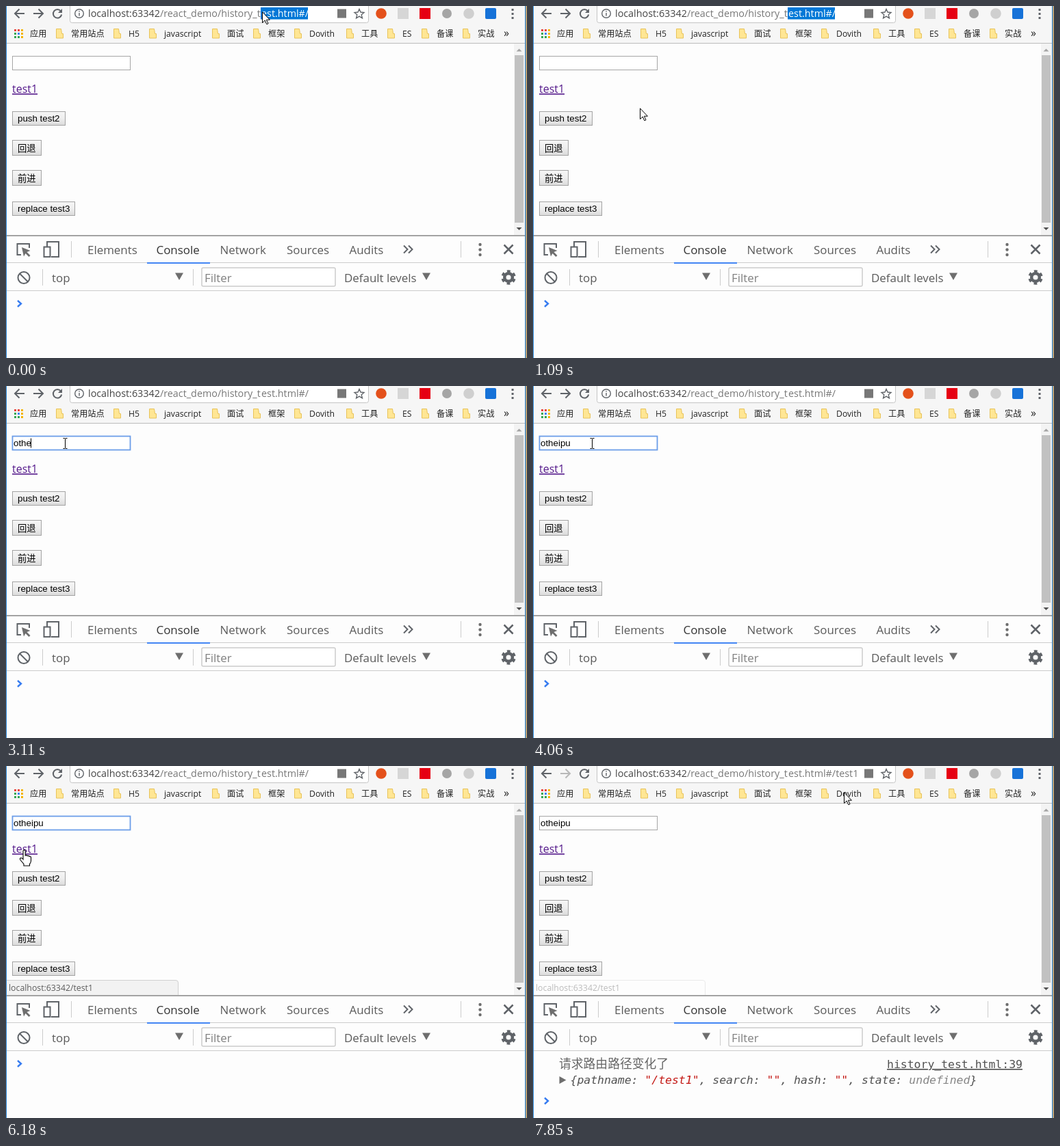
Animation of 761x515 px, one loop 7.99 s. Source, as an HTML page:

```html
<!DOCTYPE html>
<html lang="zh">
<head>
<meta charset="utf-8">
<title>History demo</title>
<style>
html, body { margin: 0; width: 100%; height: 100%; overflow: hidden; background: #fdfdfd; }
svg { display: block; }
text { white-space: pre; font-family: 'Open Sans', 'Noto Sans CJK SC', 'Noto Sans CJK', sans-serif; }
.url { font-size: 14.35px; fill: #777; }
.mark { font-size: 12.2px; fill: #222; }
.form { font: 13.333px 'Liberation Sans', 'Noto Sans CJK SC', 'Noto Sans CJK', sans-serif; fill: #000; }
.tool { font-size: 16.9px; fill: #5a5a5a; }
.mono { font: 16.45px 'DejaVu Sans Mono', monospace; fill: #505050; }
.log { font: 300 17.8px 'Noto Sans CJK SC', 'Noto Sans CJK', sans-serif; fill: #666; }
.line { fill: none; stroke: #5f6368; stroke-width: 2; }
.thin { stroke-width: 1.4; }
.rule { stroke: #ccc; fill: none; }
</style>
</head>
<body>
<svg width="761" height="515" viewBox="0 0 761 515">
  <defs>
    <linearGradient id="face" x2="0" y2="1">
      <stop offset="0" stop-color="#f6f6f6"/><stop offset=".5" stop-color="#eee"/><stop offset="1" stop-color="#dadada"/>
    </linearGradient>
  </defs>
  <rect width="761" height="515" fill="#fdfdfd"/>

  <!-- Address bar -->
  <rect width="758" height="54" fill="#f6f6f6"/>
  <g class="line">
    <path d="M27 11H13M19.5 4.5L13 11l6.5 6.5"/>
    <path id="forward" d="M40 11H54M47.5 4.5L54 11l-6.500 6.500"/>
    <path d="M80 7.500A6.200 6.200 0 1 0 81.200 12.500"/>
    <path d="M82 4v6h-6z" fill="#5f6368" stroke="none"/>
  </g>
  <rect x="93.500" y="-6" width="436" height="30.500" rx="3" fill="#fff" stroke="#c4c4c4"/>
  <circle cx="107" cy="11" r="6.300" class="line thin"/>
  <path d="M107 10v4.500M107 7v1.600" class="line thin"/>
  <rect id="selection" x="372" y="2" width="69" height="17.500" fill="#0078d7"/>
  <text x="120" y="16" class="url"><tspan fill="#444">localhost:63342</tspan>/react_demo/history_t</text>
  <text id="urlEnd" x="373" y="16" class="url"></text>
  <rect x="484" y="4.500" width="13" height="13" fill="#777"/>
  <path d="M516 4.500l2 4.500 5 .5-3.800 3.300 1.200 5-4.400-2.700-4.400 2.700 1.200-5-3.800-3.300 5-.5z" class="line thin"/>
  <circle cx="548" cy="11" r="7.800" fill="#e4511b"/>
  <rect x="572" y="3" width="16" height="16" fill="#d6d6d6"/>
  <rect x="604" y="3" width="16" height="16" fill="#e60012"/>
  <circle cx="644" cy="11" r="7" fill="#a5a5a5"/>
  <circle cx="676" cy="11" r="7.800" fill="#cfcfcf"/>
  <rect x="700" y="3" width="16" height="16" rx="2" fill="#1672d8"/>
  <path d="M738.500 4h3v3h-3zM738.500 10h3v3h-3zM738.500 16h3v3h-3z" fill="#5f6368"/>

  <g id="bookmarks"></g>
  <path d="M1 54.500H758" stroke="#bcbcbc"/>

  <!-- Page -->
  <rect id="field" x="9.500" y="73.500" width="172" height="20" fill="#fff"/>
  <text id="typed" x="11" y="88" class="form"></text>
  <path id="caret" d="M0 76.500v14" stroke="#000"/>
  <text x="9" y="127" font-size="16" fill="#551a8b" text-decoration="underline">test1</text>
  <g id="buttons"></g>
  <rect x="742" y="55" width="16" height="281" fill="#f3f3f3"/>
  <rect x="743" y="72" width="13" height="245" fill="#c1c1c1"/>
  <path d="M745.500 66.500l4-4 4 4z" fill="#a3a3a3"/>
  <path d="M745.500 324l4 4 4-4z" fill="#505050"/>
  <g id="status">
    <path id="bubble" d="M0 313.500H248q3.500 0 3.500 3.500V336H0z" stroke="#d0d0d0"/>
    <text x="4" y="329" font-size="12.3" fill="#5c5c5c">localhost:63342/test1</text>
  </g>

  <!-- Developer tools -->
  <rect y="335" width="758" height="180" fill="#fdfdfd"/>
  <rect y="335" width="758" height="2" fill="#a3a3a3"/>
  <path class="rule" d="M0 375.500H758M0 416.500H758M95.500 344v24M664.500 344v24M53.500 385v24M273.500 385v24"/>
  <rect x="206" y="375" width="92" height="2" fill="#4285f4"/>
  <rect x="286" y="383" width="195" height="27" rx="2" fill="#fff" stroke="#ccc" stroke-width="1.500"/>
  <g id="tabs"></g>
  <g class="line">
    <path d="M22 364h-5.500V348H34v6"/>
    <path d="M23 353l12.500 5-5 2 5 5-2 2-5-5-2.500 4.500z" fill="#6e6e6e" stroke="none"/>
    <path d="M60 352v-7H77v22H66M55.500 352.500h9v14.500h-9z"/>
    <path d="M581 350.500l5.500 5.500-5.500 5.500M588 350.500l5.500 5.500-5.500 5.500"/>
    <path d="M727.500 349.500l13 13M740.500 349.500l-13 13" stroke-width="2.500"/>
    <circle cx="26" cy="397.500" r="8.500"/>
    <path d="M20 391.500l12 12"/>
    <circle cx="734" cy="397" r="5.800" style="stroke-width:4.500"/>
    <circle cx="734" cy="397" r="9" style="stroke-width:3.500" stroke-dasharray="4.712" stroke-dashoffset="-2.356"/>
  </g>
  <g fill="#6e6e6e">
    <circle cx="692.500" cy="349" r="2.200"/><circle cx="692.500" cy="356.500" r="2.200"/><circle cx="692.500" cy="364" r="2.200"/>
    <path d="M247 390.500h12l-6 10.500zM608 390.500h12l-6 10.500z"/>
  </g>
  <g id="log">
    <text x="38" y="442" class="log">请求路由路径变化了</text>
    <text x="517" y="442" class="mono" text-decoration="underline">history_test.html:39</text>
    <path d="M38.500 454v11l10-5.500z" fill="#6e6e6e"/>
    <text x="54.500" y="465" class="mono" style="font-style:italic">{pathname: <tspan fill="#c41a16">"/test1"</tspan>, search: <tspan fill="#c41a16">""</tspan>, hash: <tspan fill="#c41a16">""</tspan>, state: <tspan fill="#858585">undefined</tspan>}</text>
  </g>
  <path id="prompt" d="M16.500 431l5 4.500-5 4.500" fill="none" stroke="#367cf1" stroke-width="2.400"/>

  <!-- Window edges -->
  <path d="M.5 0V515M758.500 0V515" stroke="#2482d6"/>
  <rect x="759" width="2" height="515" fill="#b8a27a"/>

  <path id="arrow" d="M.5 .8V16.500L4.200 13l2.600 5.700 2.200-1-2.600-5.500h5z" fill="#fff" stroke="#000"/>
  <path id="beam" d="M-3 -7.500H-1Q0 -7.500 0 -6.500Q0 -7.500 1 -7.500H3M0 -6.500V6.500M-3 7.500H-1Q0 7.500 0 6.500Q0 7.500 1 7.500H3" fill="none" stroke="#000"/>
  <path id="hand" d="M5.500 13.500V2a1.600 1.600 0 0 1 3.200 0V8.500q2.600-1 3 .6 2.400-.8 2.800.8 2.500-.6 2.500 1.600V16q0 3-2 5v2.500H6.500V21L1.500 15q-1.500-3 1-3 1.500 0 3 2z" fill="#fff" stroke="#000" stroke-width="1.100"/>
</svg>
<script>
const LOOP = 7990, WORD = 'otheipu';
const $ = id => document.getElementById(id);
const label = (x, y, cls, text, extra = '') => `<text x="${x}" y="${y}" class="${cls}" ${extra}>${text}</text>`;
const show = (id, on) => $(id).style.display = on ? '' : 'none';

const folders = [[95, '常用站点'], [179, 'H5'], [231, 'javascript'], [323, '面试'], [383, '框架'],
  [443, 'Dovith'], [519, '工具'], [579, 'ES'], [629, '备课'], [689, '实战']];
const dotColors = ['#e8453c', '#e8453c', '#f4b400', '#34a853', '#4285f4', '#f4b400', '#34a853', '#34a853', '#f4b400'];
$('bookmarks').innerHTML =
  dotColors.map((c, i) => `<rect x="${12 + i % 3 * 5}" y="${34 + Math.floor(i / 3) * 5}" width="3" height="3" fill="${c}"/>`).join('') +
  label(35, 45, 'mark', '应用') + label(727, 45, 'mark', '»', 'style="font-size:16px"') +
  folders.map(([x, name]) =>
    `<path d="M${x - 21.5} 33.500h7l1 7h2v6.500h-10z" fill="#ffe694" stroke="#e8c35a"/>` + label(x, 45, 'mark', name)).join('');

$('buttons').innerHTML = [[154, 78, 21, 'push test2'], [196, 43, 23, '回退'], [240, 43, 23, '前进'], [286, 92, 21, 'replace test3']]
  .map(([y, w, h, name]) =>
    `<rect x="9.500" y="${y + .5}" width="${w - 1}" height="${h - 1}" fill="url(#face)" stroke="#a3a3a3"/>` +
    label(17, y + (h > 21 ? 17 : 15), 'form', name)).join('');

$('tabs').innerHTML = [[119, 'Elements'], [219.5, 'Console', 'style="fill:#333"'], [312.5, 'Network'], [410, 'Sources'], [501.5, 'Audits']]
  .map(([x, name, extra]) => label(x, 363, 'tool', name, extra)).join('') +
  label(67, 404, 'tool', 'top') + label(290, 404, 'tool', 'Filter', 'style="fill:#808080"') +
  label(494, 404, 'tool', 'Default levels');

// Each track lists [start time, value...]; a value holds until the next start.
const pointer = [[0, 'arrow', 374, 8], [120, 'arrow', 430, 5], [240, 'arrow', 488, 15], [390, 'arrow', 353, 51],
  [510, 'arrow', 386, 35], [660, 'arrow', 300, 112], [790, 'arrow', 243, 168], [940, 'arrow', 243, 167],
  [1090, 'arrow', 156, 149], [1210, 'arrow', 120, 122], [1340, 'arrow', 98, 101], [1460, 'arrow', 90, 93],
  [1600, 'beam', 86.5, 84], [5210, 'arrow', 56, 103], [5350, 'hand', 29, 112], [5470, 'hand', 19.5, 122.5],
  [7570, 'arrow', 238, 98], [7730, 'arrow', 465, 35], [7850, 'arrow', 454, 38]];
const letters = [[0, 0], [2650, 1], [2800, 2], [3110, 4], [3230, 5], [3380, 6], [3500, 7]];
const caretOn = [[0, false], [1850, true], [2380, false], [2650, true], [4060, false], [4620, true],
  [5210, false], [5620, true], [6180, false], [6760, true], [7010, false]];
const statusOpacity = [[0, 0], [5620, .5], [5770, 1], [7730, .75], [7850, .4]];
const at = (track, t) => track.findLast(step => step[0] <= t).slice(1);

function draw(t) {
  const focused = t >= 1850 && t < 7010, selected = t < 1850, routed = t >= 7170;
  show('selection', selected);
  $('urlEnd').textContent = 'est.html#/' + (routed ? 'test1' : '');
  $('urlEnd').style.fill = selected ? '#fff' : '';
  $('forward').style.stroke = routed ? '#b8b8b8' : '';

  $('field').setAttribute('stroke', focused ? '#6b9de8' : '#a6a6a6');
  $('field').setAttribute('stroke-width', focused ? 1.8 : 1);
  $('typed').textContent = WORD.slice(0, at(letters, t)[0]);
  show('caret', at(caretOn, t)[0]);
  const caretX = Math.floor(11 + $('typed').getComputedTextLength()) + .5;
  $('caret').setAttribute('transform', `translate(${caretX})`);

  $('status').style.opacity = at(statusOpacity, t)[0];
  $('bubble').setAttribute('fill', routed ? '#fdfdfd' : '#f2f2f2');
  show('log', routed);
  $('prompt').setAttribute('transform', `translate(.5 ${routed ? 54.5 : 0})`);

  const [kind, x, y] = at(pointer, t);
  for (const id of ['arrow', 'beam', 'hand']) show(id, id === kind);
  $(kind).setAttribute('transform', `translate(${x} ${y})`);
}

const start = performance.now();
function tick() {
  draw((performance.now() - start) % LOOP);
  requestAnimationFrame(tick);
}
tick();
</script>
</body>
</html>
```
